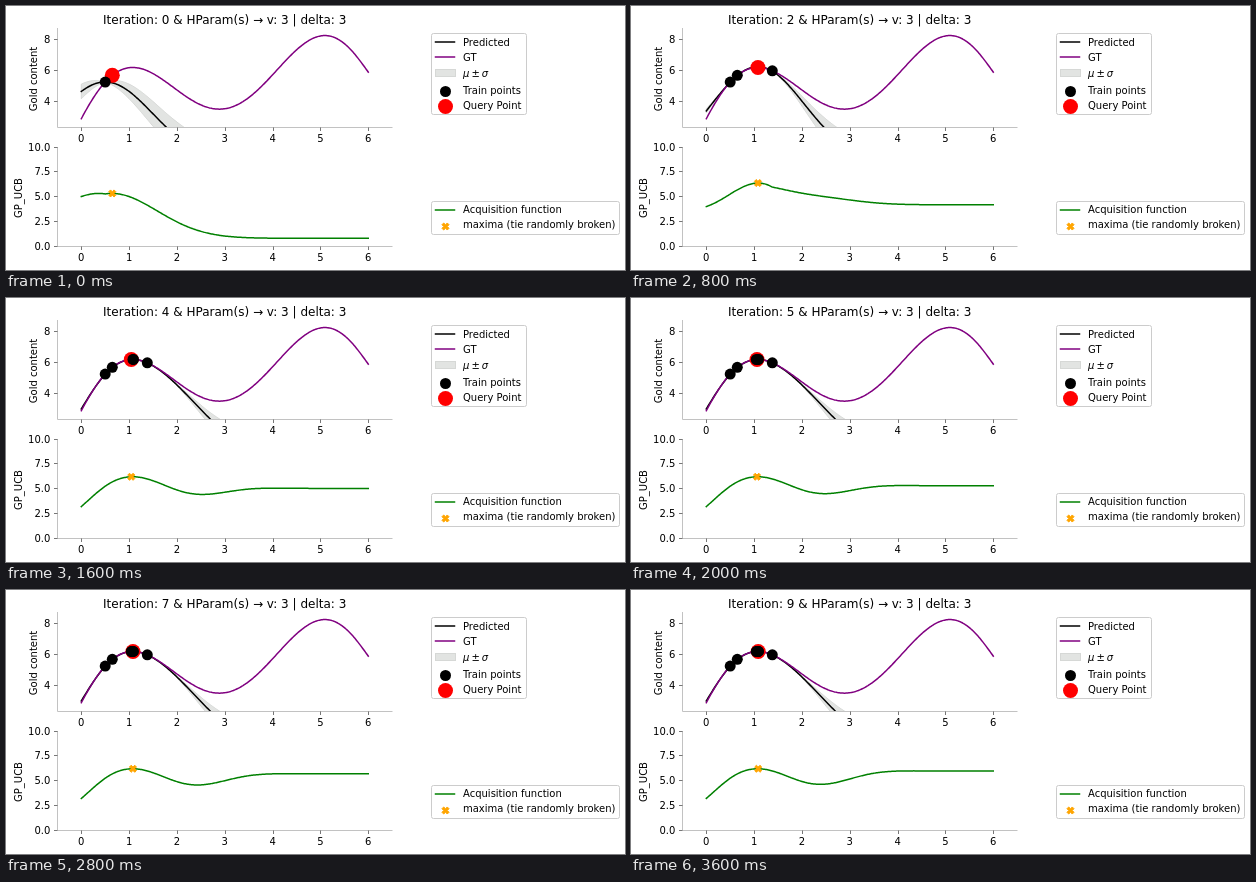
Write an HTML page that moves like this. It is 619 px wide and 264 px high and loops after 4000 ms.

```html
<!DOCTYPE html>
<html lang="en">
<head>
<meta charset="utf-8">
<title>Bayesian optimisation</title>
<style>
  html, body { margin: 0; width: 100%; height: 100%; overflow: hidden; background: #fff; }
  svg { display: block; width: 619px; height: 264px; }
  text { font: 10px "DejaVu Sans", sans-serif; }
  .title { font-size: 12px; }
  .mid { text-anchor: middle; }
  .end { text-anchor: end; }
  .line { fill: none; stroke-width: 1.5; stroke-linejoin: round; stroke-linecap: square; }
  .spine { fill: none; stroke: #c2c2c2; }
  .tick { stroke: #555; stroke-width: .8; }
  .band { fill: #e2e4e2; stroke: #d6d8d6; stroke-width: 1; }
  .legend { fill: #fff; stroke: #ccc; }
  .cross { fill: orange; stroke: orange; }
</style>
</head>
<body>
<svg id="stage" viewBox="0 0 619 264">
  <clipPath id="clip"><rect x="51.5" y="22" width="335" height="99.5"/></clipPath>
</svg>
<script>
const STEP = 400;
const SAMPLES = 300;
const START = 0.5;
const QUERIES = [0.648, 1.38, 1.08, 1.09, 1.045, 1.06, 1.07, 1.08, 1.085, 1.085];
const TRUTH = [[0, 2.85], [0.5, 5.21], [1.08, 6.15], [2, 4.7],
  [2.88, 3.47], [4, 5.68], [5.12, 8.2], [6, 5.85]];
// Anchors of the predicted mean, by number of training points.
const ANCHORS = [
  [[0.5, 5.22]],
  [[0, 3.25], [1, 6.07]],
  [[0, 3.36], [1.08, 6.2], [2.4, 2.5]],
  [[0, 2.97], [0.575, 5.43], [1.08, 6.15], [1.38, 5.93], [2.65, 2.46]]
];
const CENTERS = [0.5, 0.575, 0.843, 0.93];

const stage = document.getElementById("stage");
const px = x => 75.3 + 47.83 * x;
const topY = v => 157.1 - 15.55 * v;
const lowY = v => 239.65 - 9.9 * v;
const snap = v => Math.round(v) + 0.5;
const grid = Array.from({ length: SAMPLES + 1 }, (_, i) => 6 * i / SAMPLES);

function add(tag, attrs, parent = stage, content) {
  const el = document.createElementNS("http://www.w3.org/2000/svg", tag);
  for (const key in attrs) el.setAttribute(key, attrs[key]);
  if (content !== undefined) el.textContent = content;
  return parent.appendChild(el);
}
const label = (x, y, str, cls = "") => add("text", { x, y, class: cls }, stage, str);
const points = (xs, fn, mapY) => xs.map(x => px(x).toFixed(2) + "," + mapY(fn(x)).toFixed(2));
const polyline = pts => "M" + pts.join("L");
const curve = (color, parent) => add("path", { class: "line", stroke: color }, parent);
const dot = (x, y, r, fill, parent) => add("circle", { cx: x, cy: y, r, fill }, parent);
const crossAt = (x, y) => `translate(${x} ${y}) scale(1.77)`;

function cross(x, y) {
  const d = "M-1-2 0-1 1-2 2-1 1 0 2 1 1 2 0 1-1 2-2 1-1 0-2-1Z";
  return add("path", { d, class: "cross", "stroke-width": 0.55, transform: crossAt(x, y) });
}

const kernel = (a, b) => Math.exp(-((a - b) ** 2) / 2);

// Lagrange polynomial through a few points.
const through = pts => x => pts.reduce((sum, [a, v]) => {
  for (const [b] of pts) if (b !== a) v *= (x - b) / (a - b);
  return sum + v;
}, 0);
const truth = through(TRUTH);

// Gaussian times the polynomial that meets the anchors.
function meanOf(n) {
  const k = Math.min(n, 4) - 1, c = CENTERS[k];
  const factor = through(ANCHORS[k].map(([a, v]) => [a, v / kernel(a, c)]));
  return x => kernel(x, c) * factor(x);
}

// Posterior deviation by Cholesky factorisation.
function sigmaOf(xs) {
  const rows = [];
  const forward = (rhs, n) => {
    const out = [];
    for (let i = 0; i < n; i++) {
      let v = rhs[i];
      for (let j = 0; j < i; j++) v -= rows[i][j] * out[j];
      out.push(v / rows[i][i]);
    }
    return out;
  };
  const rest = (v, base) => base - v.reduce((sum, e) => sum + e * e, 0);
  xs.forEach((x, i) => {
    const row = forward(xs.map(b => kernel(x, b)), i);
    row.push(Math.sqrt(Math.max(rest(row, 1 + 1e-10), 1e-10)));
    rows.push(row);
  });
  return x => Math.sqrt(Math.max(0, rest(forward(xs.map(b => kernel(x, b)), xs.length), 1)));
}

const beta = t => Math.sqrt(6 * (2.5 * Math.log(t) + Math.log(Math.PI ** 2 / 9)));

function buildStep(i) {
  const xs = [START, ...QUERIES.slice(0, i)], query = QUERIES[i];
  const mean = meanOf(xs.length), sigma = sigmaOf(xs), b = beta(i + 1);
  const acq = x => mean(x) + b * sigma(x);
  const upper = points(grid, x => mean(x) + sigma(x), topY);
  const lower = points(grid, x => mean(x) - sigma(x), topY).reverse();
  return {
    xs, query, peak: acq(query),
    band: polyline(upper.concat(lower)) + "Z",
    mean: polyline(points(grid, mean, topY)),
    acq: polyline(points(grid, acq, lowY))
  };
}

function drawAxes(top, bottom, ticks, mapY, digits) {
  add("path", { class: "spine", d: `M51.5 ${top}V${bottom}H386.5` });
  for (let x = 0; x <= 6; x++) {
    add("path", { class: "tick", d: `M${snap(px(x))} ${bottom}v3.5` });
    label(px(x), bottom + 15.5 - 1, x, "mid");
  }
  for (const v of ticks) {
    const ty = snap(mapY(v));
    add("path", { class: "tick", d: `M51.5 ${ty}h-3.5` });
    label(44.3, ty + 3.5, v.toFixed(digits), "end");
  }
}

function drawLegends() {
  const box = (y, width, height) => add("rect", { class: "legend", x: 425.5, y, width, height, rx: 2 });
  const sample = (y, color) => curve(color).setAttribute("d", `M429.5 ${y}h19`);
  box(27.5, 95, 81);
  sample(36, "black");
  sample(51, "purple");
  add("rect", { class: "band", x: 429.5, y: 63.5, width: 20, height: 7 });
  dot(439.5, 85.5, 5.5, "black");
  dot(439.5, 100.5, 7.5, "red");
  label(457, 40, "Predicted");
  label(457, 55, "GT");
  const math = label(457, 71, "");
  add("tspan", { "font-style": "oblique" }, math, "μ");
  add("tspan", { dx: 2 }, math, "±");
  add("tspan", { dx: 2, "font-style": "oblique" }, math, "σ");
  label(457, 88, "Train points");
  label(457, 103, "Query Point");

  box(195.5, 188, 33);
  sample(204, "green");
  cross(439.5, 220.5);
  label(457, 207, "Acquisition function");
  label(457, 222, "maxima (tie randomly broken)");
}

const plot = add("g", { "clip-path": "url(#clip)" });
const band = add("path", { class: "band" }, plot);
const meanLine = curve("black", plot);
curve("purple", plot).setAttribute("d", polyline(points(grid, truth, topY)));
const acqLine = curve("green");
drawAxes(22, 121.5, [8, 6, 4], topY, 0);
drawAxes(141, 240.5, [10, 7.5, 5, 2.5, 0], lowY, 1);
const queryDot = dot(0, 0, 7.5, "red");
const train = add("g", {});
const best = cross(0, 0);
const title = label(218.7, 18, "", "mid title");
add("text", { class: "mid", transform: "translate(31 73) rotate(-90)" }, stage, "Gold content");
add("text", { class: "mid", transform: "translate(16 192) rotate(-90)" }, stage, "GP_UCB");
drawLegends();

const steps = QUERIES.map((_, i) => buildStep(i));
let shown = -1;

function show(i) {
  const s = steps[i];
  title.textContent = `Iteration: ${i} & HParam(s) → v: 3 | delta: 3`;
  band.setAttribute("d", s.band);
  meanLine.setAttribute("d", s.mean);
  acqLine.setAttribute("d", s.acq);
  queryDot.setAttribute("cx", px(s.query));
  queryDot.setAttribute("cy", topY(truth(s.query)));
  best.setAttribute("transform", crossAt(px(s.query), lowY(s.peak)));
  train.replaceChildren();
  for (const x of s.xs) dot(px(x), topY(truth(x)), 5.5, "black", train);
  shown = i;
}

const began = performance.now();
function tick() {
  const i = Math.floor((performance.now() - began) / STEP) % steps.length;
  if (i !== shown) show(i);
  requestAnimationFrame(tick);
}
show(0);
requestAnimationFrame(tick);
</script>
</body>
</html>
```
